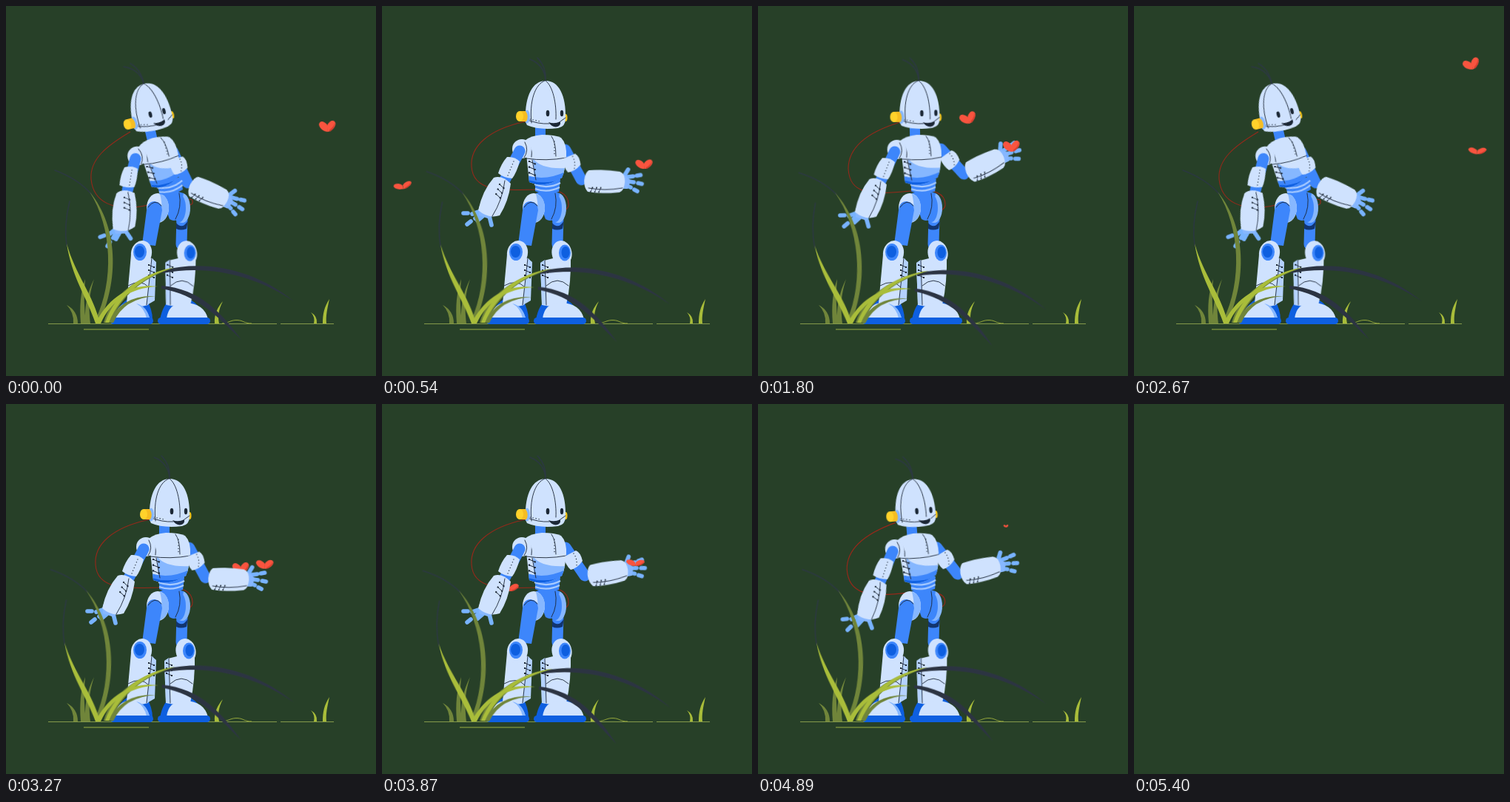
An HTML page without scripts that plays this animation: 500 by 500 pixels, repeating every 5.43 s.

```html
<!DOCTYPE html>
<html lang="en">
<head>
<meta charset="utf-8">
<title>Robot and butterflies</title>
<style>
html, body { margin: 0; width: 100%; height: 100%; overflow: hidden; background: #274028; }
svg { display: block; width: 100vw; height: 100vh; }

.light { fill: #cfe2fe; }
.mid { fill: #86b7ff; }
.blue { fill: #3d86fb; }
.deep { fill: #0e5fe0; }
.finger { fill: none; stroke: #78b3ff; stroke-width: 5.6; stroke-linecap: round; }
.limb { fill: none; stroke: #3d86fb; stroke-width: 15; stroke-linecap: round; }
.ink { fill: #1c2836; }
.seam { fill: none; stroke: #1c2836; stroke-width: .9; stroke-linecap: round; }
.dots { fill: none; stroke: #1c2836; stroke-width: 1.3; stroke-dasharray: .1 4; stroke-linecap: round; }
.lime { fill: #a9bd3a; }
.olive { fill: #70853a; }
.shade { fill: #2c3442; }
.tail { fill: none; stroke: #2b3840; stroke-width: 1.5; stroke-linecap: round; }
.cable { fill: none; stroke: #96281a; stroke-width: 1.1; }

.scene, .lean, .chest, .head, .face, .near, .upper, .fore, .shin, .cable, .blades, .arcs, .guest, .east, .west {
  animation: 5430ms ease-in-out infinite;
}
.scene { animation-name: scene; animation-timing-function: linear; }
.lean { animation-name: lean; transform-origin: 222px 245px; }
.chest { animation-name: chest; transform-origin: 196px 245px; }
.head { animation-name: head; transform-origin: 214px 167px; }
.face { animation-name: face; }
.near { animation-name: near; transform-origin: 165px 236px; }
.upper { animation-name: upper; transform-origin: 246px 190px; }
.fore { animation-name: fore; transform-origin: 274px 233px; }
.shin { animation-name: shin; transform-origin: 232px 412px; }
.cable { animation-name: cable; }
.blades { animation-name: blades; transform-origin: 125px 428px; }
.arcs { animation-name: arcs; transform-origin: 130px 428px; }
.guest { animation-name: guest; }
.east { animation-name: east; animation-timing-function: linear; }
.west { animation-name: west; animation-timing-function: linear; }
.flap { animation: flap 181ms ease-in-out infinite alternate; fill: #f8543f; }
.tilt { animation: tilt 181ms ease-in-out infinite alternate; transform-origin: 0 7px; }
.fast { animation-duration: 142.9ms; animation-delay: -200.7ms; }
.calm { animation-duration: 226.25ms; }

@keyframes scene {
  0%, 99.43% { visibility: visible; }
  99.44%, 100% { visibility: hidden; }
}
/* the robot acts twice per loop, so stops come in pairs */
@keyframes lean {
  0%, 48.6%, 49.72%, 98.3%, 100% { transform: translate(-1px, 1px) rotate(-13deg); }
  10%, 59.7%, 21.55%, 71.3% { transform: translate(0, 0) rotate(0deg); }
  32.3%, 82%, 35.9%, 85.6% { transform: translate(0, 0) rotate(-1.5deg); }
}
@keyframes chest {
  0%, 48.6%, 49.72%, 98.3%, 100% { transform: scaleX(.9); }
  10%, 59.7%, 35.9%, 85.6% { transform: scaleX(1); }
}
@keyframes head {
  0%, 48.6%, 49.72%, 98.3%, 100% { transform: translate(0, -1px) rotate(-1deg); }
  10%, 59.7%, 35.9%, 85.6% { transform: translate(0, 0) rotate(0deg); }
}
@keyframes face {
  0%, 48.6%, 49.72%, 98.3%, 100% { transform: translate(-4.5px, -1.5px); }
  10%, 59.7%, 35.9%, 85.6% { transform: translate(0, 0); }
}
@keyframes near {
  0%, 48.6%, 49.72%, 98.3%, 100% { transform: translate(0, 2px) rotate(-7deg); }
  10%, 59.7%, 35.9%, 85.6% { transform: translate(0, 0) rotate(0deg); }
}
@keyframes upper {
  0%, 48.6%, 49.72%, 98.3%, 100% { transform: translate(-9px, 4px) rotate(22deg); }
  10.5%, 60.2% { transform: translate(0, 0) rotate(6deg); animation-timing-function: linear; }
  21.55%, 71.3% { transform: translate(0, 0) rotate(0deg); animation-timing-function: ease-out; }
  32.3%, 82%, 35.9%, 85.6% { transform: translate(0, 0) rotate(-6.5deg); }
}
@keyframes fore {
  0%, 48.6%, 49.72%, 98.3%, 100% { transform: rotate(14deg); }
  10.5%, 60.2% { transform: rotate(-5deg); animation-timing-function: linear; }
  21.55%, 71.3% { transform: rotate(-10deg); animation-timing-function: ease-out; }
  32.3%, 82%, 35.9%, 85.6% { transform: rotate(-18deg); }
}
@keyframes shin {
  0%, 48.6%, 49.72%, 98.3%, 100% { transform: rotate(1.2deg); }
  10%, 59.7%, 35.9%, 85.6% { transform: rotate(0deg); }
}
@keyframes cable {
  0%, 48.6%, 49.72%, 98.3%, 100% { d: path("M168 170C136 189 113 207 115 234C118 265 145 279 192 269C225 268 251 257 252 263C253 268 250 269 246 269"); }
  10%, 59.7%, 21.55%, 71.3% { d: path("M194 156C143 167 119 190 121 217C123 249 156 250 210 248C240 246 252 254 252 268C252 276 244 278 240 278"); }
  32.3%, 82%, 35.9%, 85.6% { d: path("M192 157C146 171 122 192 122 220C124 254 150 256 206 250C240 246 253 254 253 268C253 276 244 278 240 278"); }
}
@keyframes blades {
  0%, 48.6%, 49.72%, 98.3%, 100% { transform: rotate(0deg); }
  10.5%, 60.2% { transform: rotate(-1.6deg); }
  21.55%, 71.3%, 33%, 82.7% { transform: rotate(-3deg); }
}
@keyframes arcs {
  0%, 48.6%, 49.72%, 98.3%, 100% { transform: rotate(0deg); }
  10.5%, 60.2% { transform: rotate(1deg); }
  21.55%, 71.3%, 33%, 82.7% { transform: rotate(2.6deg); }
}
@keyframes guest {
  0%, 49.72% { transform: translate(435px, 162px) scale(1); animation-timing-function: linear; }
  10.5%, 60.2% { transform: translate(350px, 216px) scale(1); animation-timing-function: ease-out; }
  13.8%, 63.5% { transform: translate(342px, 226px) scale(1); animation-timing-function: linear; }
  21.55%, 71.3% { transform: translate(342px, 214px) scale(1); animation-timing-function: ease-out; }
  32.3%, 82%, 35.9%, 85.6% { transform: translate(343px, 189px) scale(1); }
  43%, 92.7% { transform: translate(332px, 155px) scale(0); }
  49.7%, 100% { transform: translate(435px, 162px) scale(0); }
}
@keyframes east {
  0%, 5.7% { transform: translate(-20px, 259px); }
  21.55% { transform: translate(157px, 197px); }
  33.15% { transform: translate(284px, 151px); }
  49.17% { transform: translate(456px, 78px); }
  55%, 100% { transform: translate(520px, 51px); }
}
@keyframes west {
  0%, 45% { transform: translate(518px, 185px); }
  49.17% { transform: translate(464px, 195px); }
  60.22% { transform: translate(318px, 221px); }
  81.77% { transform: translate(35px, 272px); }
  86.4%, 100% { transform: translate(-26px, 283px); }
}
@keyframes flap { from { transform: scaleY(1); } to { transform: scaleY(.62); } }
@keyframes tilt { from { transform: rotate(-9deg); } to { transform: rotate(6deg); } }
</style>
</head>
<body>
<svg viewBox="0 0 500 500">
  <defs>
    <path id="wing" d="M0 8C-3 8-11 5-12-2C-11-9-3-6 0 0Z"/>
    <g id="right">
      <use href="#wing" transform="scale(-1 1)"/>
      <path d="M2 6Q9 3 11-3Q11 4 3 8Z" fill="#d63c2e"/>
    </g>
    <g id="lace">
      <path class="seam" d="M0 0l7 3M0 7l7 3M0 14l7 3"/>
      <path class="ink" d="M-1-1h2v2h-2zM-1 6h2v2h-2zM-1 13h2v2h-2zM6 2h2v2h-2zM6 9h2v2h-2zM6 16h2v2h-2z"/>
    </g>
    <clipPath id="trunk"><path d="M195 200L249 200Q248 222 243 232Q220 247 199 238Z"/></clipPath>
  </defs>

  <g class="scene">
    <!-- ground -->
    <path d="M57 429.5H366M371 429.5H443" stroke="#84994a" fill="none"/>
    <path d="M105 437H193" stroke="#748b3b" stroke-width="1.4"/>
    <path d="M292 429C302 428 304 424 313 424.5C321 425 322 429 332 429" fill="none" stroke="#93a63b"/>
    <path class="olive" d="M91 429Q92 414 82 404Q97 412 97 429ZM101 429Q98 394 107 369Q104 398 108 429ZM107 429C106 402 111 385 119 369C111 394 112 408 114 429Z"/>
    <path class="lime" d="M282 429C281 417 286 407 293 399C287 411 286 419 288 429ZM416 429Q418 420 412 414Q421 419 420 429ZM428 429C428 416 430 407 437 396C434 410 432 419 433 429Z"/>

    <path class="cable"/>

    <!-- passing butterflies -->
    <g class="east"><g transform="rotate(-14)"><g class="flap fast">
      <use href="#wing"/>
      <g class="tilt fast"><use href="#right"/></g>
    </g></g></g>
    <g class="west"><g class="flap">
      <use href="#wing"/>
      <g class="tilt"><use href="#right"/></g>
    </g></g>

    <!-- far arm -->
    <g class="lean"><g class="upper">
      <path class="limb" d="M248 194L274 232"/>
      <g class="fore">
        <path class="finger" d="M330 229L337 217M337 227L344 226M349 225L354 224M338 233L345 234M351 235L356 236M336 239L341 241M346 244L350 246"/>
        <path class="mid" d="M326 224L334 225L341 232L337 243L326 243Z"/>
        <path class="light" d="M284 219Q304 217 326 220Q333 222 333 234Q332 246 326 248Q302 251 283 248Q278 243 278 233Q279 222 284 219Z"/>
        <path class="seam" d="M284 243Q305 247 330 242"/>
        <use href="#lace" transform="translate(287 248) rotate(-90) scale(.8)"/>
      </g>
    </g></g>

    <!-- legs -->
    <path class="limb" d="M238 284L237 322"/>
    <path d="M230 293Q238 303 246 290L244 301Q236 304 230 301Z" fill="#12356f"/>
    <ellipse class="mid" cx="238" cy="273" rx="11" ry="20"/>
    <ellipse class="blue" cx="234" cy="273" rx="9" ry="19"/>
    <path class="blue" d="M208 253Q223 247 240 253L235 282Q231 294 221 288Z"/>
    <path class="seam" d="M234 253Q238 272 229 288"/>
    <ellipse class="light" cx="205" cy="273" rx="15" ry="20"/>
    <path class="mid" d="M208 254Q220 257 220 274Q218 291 205 293Q214 276 208 254Z"/>
    <path class="blue" d="M190 276Q191 264 201 264Q211 265 211 276L202 324L184 322Z"/>
    <path class="seam" d="M192 272Q201 259 210 270"/>
    <g>
      <path class="deep" d="M145 424Q152 402 167 395L190 397Q198 410 198 424Z"/>
      <path class="light" d="M169 336L198 341L202 347L192 404Q177 409 163 402Z"/>
      <path d="M197 341L203 346L201 398L189 405Z" fill="#b4d2ff"/>
      <path class="seam" d="M197 341L190 404M165 378Q182 368 193 380"/>
      <use href="#lace" transform="translate(193 350)"/>
      <ellipse class="light" cx="183" cy="334" rx="14" ry="17" transform="rotate(12 183 334)"/>
      <ellipse class="blue" cx="181" cy="332.500" rx="9" ry="11.500"/>
      <ellipse class="deep" cx="180.500" cy="332" rx="6.500" ry="8"/>
      <path class="light" d="M146 422Q150 401 169 401Q189 403 194 422Z"/>
      <path class="mid" d="M176 402Q190 405 194 422H190Q187 408 176 402Z"/>
      <rect class="deep" x="141" y="421" width="58" height="9" rx="4.500"/>
    </g>
    <path class="deep" d="M208 424Q212 402 224 396L248 396Q264 405 270 424Z"/>
    <g class="shin">
      <path class="light" d="M219 344L255 335Q256 374 249 404Q232 408 216 404L214 348Z"/>
      <path d="M214 347L220 343L222 404L216 403Z" fill="#b4d2ff"/>
      <path class="seam" d="M220 344L222 404M222 378Q237 364 252 378"/>
      <use href="#lace" transform="translate(217 350)"/>
      <ellipse class="light" cx="243" cy="334" rx="13.500" ry="17" transform="rotate(-10 243 334)"/>
      <ellipse class="blue" cx="247" cy="333.500" rx="8" ry="11"/>
      <ellipse class="deep" cx="248" cy="333" rx="5.500" ry="8"/>
    </g>
    <path class="light" d="M217 423Q219 401 242 401Q268 402 273 423Z"/>
    <rect class="deep" x="205" y="421" width="71" height="9" rx="4.500"/>

    <!-- torso -->
    <g class="lean">
      <path class="blue" d="M207 234H241L239 251Q223 257 207 250Z"/>
      <path d="M206 241Q224 248 241 239M207 247Q224 253 240 245" fill="none" stroke="#a8cbff" stroke-width="2.200"/>
      <path class="blue" d="M207 160H221V180H207Z"/>
      <g class="chest">
        <g clip-path="url(#trunk)">
          <path class="light" d="M190 195H255V250H190Z"/>
          <path class="mid" d="M204 206Q215 221 249 219V235H206Z"/>
          <path class="deep" d="M196 231Q222 239 250 225V250H196Z"/>
          <path class="blue" d="M196 229Q222 237 250 223L249 232Q222 243 197 235Z"/>
        </g>
        <path class="light" d="M193 182Q201 175 216 174Q234 174 242 178Q250 186 249 204Q222 210 195 205Z"/>
        <path class="seam" d="M195 206Q222 210 249 205M229 176Q235 184 235 203M196 184Q204 192 202 204M203 208L208 235"/>
        <path class="dots" d="M233 183V201"/>
        <use href="#lace" transform="translate(199 210) scale(1.1)"/>
      </g>
      <g class="upper">
        <path class="light" d="M245 207L262 198Q268 200 271 212Q264 222 255 224Q249 219 245 207Z"/>
        <path class="dots" d="M259 202Q264 209 263 218"/>
      </g>
    </g>

    <!-- near arm -->
    <g class="lean">
      <circle class="light" cx="189" cy="193" r="13"/>
      <path class="limb" d="M186 196L166 235"/>
      <path class="seam" d="M193 184Q199 195 192 205"/>
      <path class="light" d="M169 204Q179 203 186 210Q182 225 176 233Q164 232 157 226Q161 213 169 204Z"/>
      <path class="dots" d="M178 210L170 229"/>
      <g class="near">
        <path class="finger" d="M134 277L122 281M116 280L110 280M134 281L126 287M120 291L115 295M136 284L129 290M145 284L148 296"/>
        <path class="mid" d="M131 271L152 280L146 288L131 283Z"/>
        <path class="light" d="M151 232Q162 228 174 240Q171 264 159 283Q144 288 130 276Q136 249 151 232Z"/>
        <path class="seam" d="M166 236Q163 262 149 284"/>
        <use href="#lace" transform="translate(159 241) rotate(20)"/>
      </g>
    </g>

    <!-- head -->
    <g class="lean"><g class="head">
      <path class="tail" d="M221 101Q220 80 200 72M221 100Q222 82 210 70"/>
      <ellipse cx="248" cy="151" rx="2.500" ry="5" fill="#f4c51d"/>
      <path class="light" d="M194 153C193 121 204 101 221 101C239 101 249 121 248 152Q248 163 238 165Q212 168 196 161Q194 158 194 153Z"/>
      <g class="face">
        <ellipse class="ink" cx="224" cy="145" rx="2.300" ry="4.200"/>
        <ellipse class="ink" cx="243" cy="145" rx="2.200" ry="4.200"/>
        <path class="ink" d="M225 157Q233 160 241 156Q242 163 235 163.500Q229 163 225 157Z"/>
      </g>
      <path class="seam" d="M220 101C206 106 199 130 202 158M221 101C231 108 236 132 235 153M194 153Q211 160 226 159M241 156L248 151"/>
      <path class="dots" d="M200 153L214 156"/>
      <ellipse class="mid" cx="196" cy="149.500" rx="4" ry="9"/>
      <path d="M186 142H194Q199 149 195 156H186Z" fill="#f5bd22"/>
      <ellipse cx="186" cy="149" rx="5" ry="7" fill="#ffd22b"/>
    </g></g>

    <!-- landing butterfly -->
    <g class="guest"><g class="flap calm">
      <use href="#wing"/>
      <g class="tilt calm"><use href="#right"/></g>
    </g></g>

    <!-- front grass -->
    <g class="blades">
      <path class="tail" d="M115 254Q98 234 66 222M82 324Q78 296 86 264"/>
      <path class="olive" d="M126 428C152 372 153 300 113 251C144 300 146 372 121 424Z"/>
      <path class="lime" d="M121 429C109 393 89 367 82 321C94 364 118 390 127 429Z"/>
    </g>
    <g class="arcs">
      <path class="shade" d="M212 357C275 341 340 359 389 399C338 365 275 349 212 361Z"/>
      <path class="shade" d="M210 378C262 382 292 415 318 451C284 418 258 390 210 382Z"/>
      <path class="olive" d="M132 428C142 392 178 363 226 354C182 369 156 392 141 428Z"/>
      <path class="olive" d="M139 428Q155 390 202 392Q159 395 145 428Z"/>
      <path class="lime" d="M121 429C137 396 166 374 205 379C166 381 141 400 128 429Z"/>
      <path class="lime" d="M134 428C148 386 184 361 228 353C187 365 155 389 139 428Z"/>
    </g>
  </g>
</svg>
</body>
</html>
```
